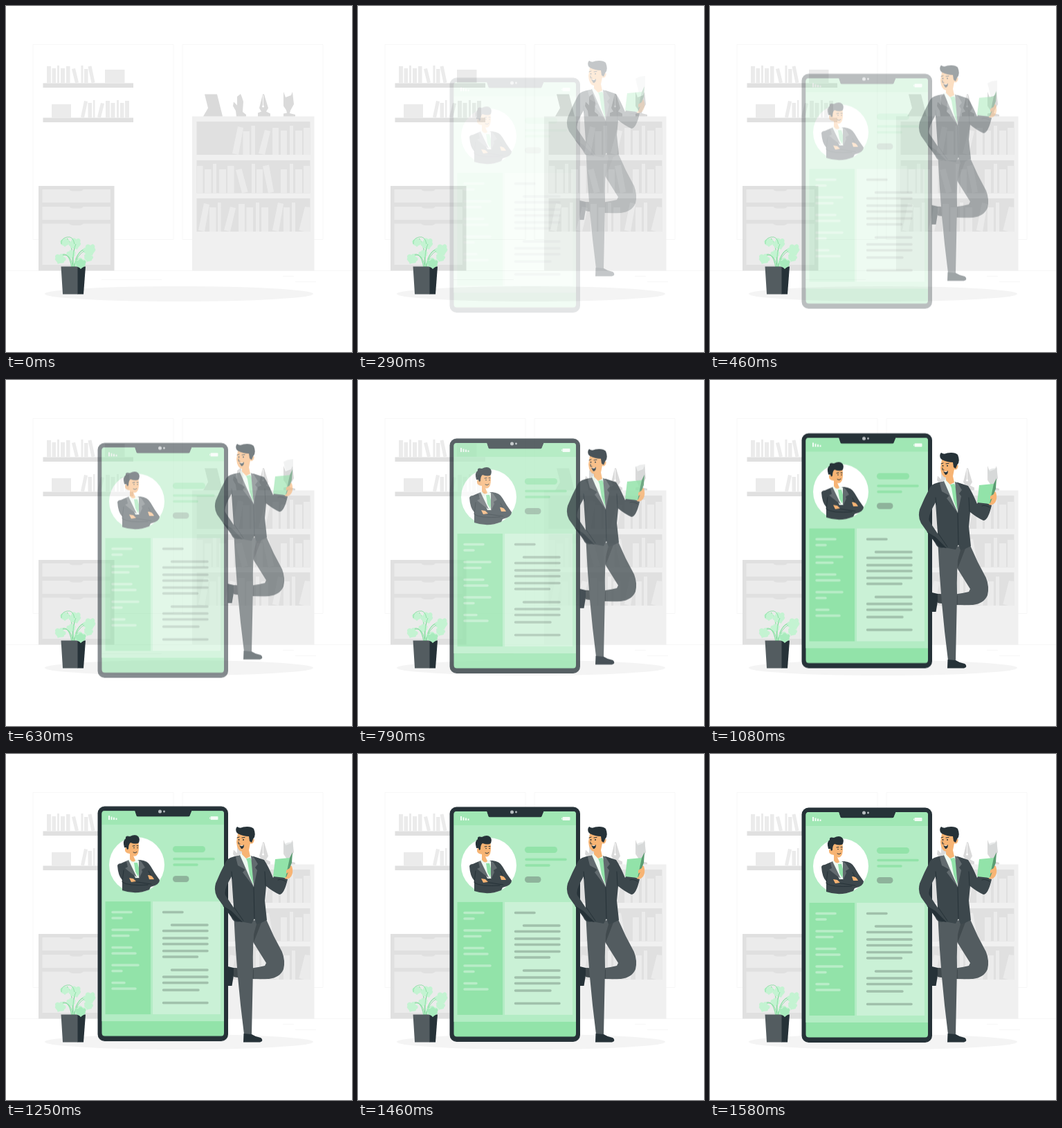
An HTML page without scripts for the animation above (1620 ms loop, 500 px wide and 500 px high).

```html
<!DOCTYPE html>
<html lang="en">
<head>
<meta charset="utf-8">
<title>Profile on a phone</title>
<style>
  html, body { margin: 0; width: 100%; height: 100%; overflow: hidden; background: #fff; }
  svg { display: block; width: 100%; height: 100%; }
  .wall { fill: none; stroke: #f7f7f7; }
  .frame { fill: #e0e0e0; }
  .pale { fill: #ebebeb; }
  .case { fill: #f0f0f0; }
  .ornament { fill: #dadada; }
  .ink { fill: #263238; }
  .suit { fill: #3c474c; }
  .lapel { fill: #626b6f; }
  .cloth { fill: #535c60; }
  .fold { fill: none; stroke: #263238; stroke-width: 1; stroke-linecap: round; }
  .skin { fill: #f7b474; }
  .shirt { fill: #eefaf2; }
  .mint { fill: #92e3a9; }
  .line { fill: none; stroke-width: 3.5; stroke-linecap: round; }
  .phone { animation: rise 1620ms infinite; }
  .man { animation: drop 1620ms linear infinite; }
  @keyframes rise {
    0% { opacity: 0; transform: translateY(30px); animation-timing-function: cubic-bezier(.36, -.01, .5, 1.38); }
    95.5%, 100% { opacity: 1; transform: none; }
  }
  @keyframes drop {
    0%, 8% { opacity: 0; transform: translateY(-30px); }
    17.9% { opacity: .27; transform: translateY(-26px); }
    38.9% { opacity: .62; transform: translateY(-12.7px); }
    48.8% { opacity: .84; transform: translateY(-5.3px); }
    56.8% { opacity: .98; transform: translateY(-.5px); }
    60%, 100% { opacity: 1; transform: none; }
  }
</style>
</head>
<body>
<svg viewBox="0 0 500 500">
  <defs>
    <path id="leaf" d="M0 9C-3 4-9 6-8 1-12-2-8-8-4-6-3-11 3-10 4-6 9-8 11-3 8 0 10 5 4 4 0 9Z"/>
  </defs>

  <!-- room -->
  <path class="wall" d="M39 55.5H242V337.500H39ZM255 55.5H458V337.500H255ZM0 382.500H500M138 395.500H225M400 390.500H416M418 398.500H448"/>
  <ellipse cx="250" cy="416" rx="194" ry="11" fill="#f4f4f4"/>

  <!-- wall shelves -->
  <path class="frame" d="M53.500 111.500h130.500v6.500h-130.500zM53.500 161.500h130.500v6.500h-130.500z"/>
  <path class="pale" d="M59 87h6v24.500h-6zM66.500 90h5.500v21.500h-5.500zM74 86h3v25.500h-3zM79 90h6v21.500h-6zM87 87h5.500v24.500h-5.500zM95 91l5-1 5 20.500-5 1zM108.500 86h3v25.500h-3zM113 91h5.500v20.500h-5.500zM118.500 87.500l5-1 5 24-5 1zM143 92h28.500v19.500h-28.500z
    M66 142h28v19.500h-28zM113 137l5 1-5 23.500-5-1zM118.500 140h5.500v21.500h-5.500zM126 136h2.500v25.500h-2.500zM137 140l5 1-5 20.500-5-1zM144 137h6v24.500h-6zM151.500 140h6v21.500h-6zM160 136h3v25.500h-3zM165 140h5.500v21.500h-5.500zM172 137h6v24.500h-6z"/>

  <!-- cabinet -->
  <path class="frame" d="M47 260h109.500v122.500h-109.500z"/>
  <path class="pale" d="M52.500 265h98.500v19h-98.500zM52.500 290h98.500v19h-98.500zM52.500 314.500h98.500v59.500h-98.500z"/>
  <path class="frame" d="M91 264.500h21q-2 3-5 3h-11q-3 0-5-3M91 289.500h21q-2 3-5 3h-11q-3 0-5-3M91 314h21q-2 3-5 3h-11q-3 0-5-3"/>

  <!-- bookcase -->
  <path class="case" d="M269 159.500h176.500v223h-176.500z"/>
  <path class="frame" d="M275.500 167h164v48h-164zM275.500 223h164v47.500h-164zM275.500 278h164v48h-164z"/>
  <path class="pale" d="M335 174l8 2-7 39-9-2zM342.500 181h9.500v34h-9.500zM354.500 173h5.500v42h-5.500zM374 179l8 2-8 34-9-2zM385 176h9v39h-9zM397 180h9v35h-9zM410 173h5v42h-5zM418 180h10v35h-10zM430 176h9v39h-9z
    M276 231h8.500v39.500h-8.500zM287 236h9.500v34.500h-9.500zM299 228h5v42.500h-5zM308 236h10v34.500h-10zM320 231h9.500v39.500h-9.500zM332 237l8.500-2 9 33.500-8.500 2zM355 228h5v42.500h-5zM362 236h9v34.500h-9zM371 231.500l9-2 7 39-8 2zM397 236h9v34.500h-9zM410 228h5v42.500h-5zM418 236h10v34.500h-10zM430 231h9v39.500h-9z
    M286 285l8 2-7 39-9-2zM294 291h9.500v35h-9.500zM306 284h4.500v42h-4.500zM324 290l8 2-8 34-9-2zM336 286h9v40h-9zM347.500 291h9.500v35h-9.500zM361 284h5v42h-5zM369 291h10v35h-10zM393 284l8 2-7 40-9-2zM401 291h9v35h-9zM413 284h5v42h-5zM432 290l7.500 1v35h-9l-7-2z"/>
  <path class="ornament" d="M287 127.500h18l8 32h-28l7-12z
    M333 159.500l-1-8-4-7 1-6 5 5V131l5-4 2 5 2 6-1 15 5 4v2.500z
    M364 159.500v-5l5-2-3-5 5-20h2l6 20-3 5 6 3v4z
    M401 159.500v-4l5-1-1-4-4-6V124l3 8 8-3 2-5 2 18-5 9-1 4 8 2v2.500z"/>
  <path d="M371.500 129v15" stroke="#fff" stroke-width=".8"/><circle cx="371.500" cy="145" r="1.500" fill="#fff"/>

  <!-- plant -->
  <g fill="none" stroke="#92e3a9" stroke-width="1.300">
    <path d="M96 378Q98 346 88 336M97 378Q95 352 104 340M98 378Q102 350 121 350M95 378Q91 354 80 360M99 378Q102 362 108 366"/>
  </g>
  <g fill="#c4f3d2">
    <use href="#leaf" transform="translate(85 342) scale(.7)"/>
    <use href="#leaf" transform="translate(100 344) rotate(-20) scale(.95)"/>
    <use href="#leaf" transform="translate(121 353) rotate(-25) scale(.98)"/>
    <use href="#leaf" transform="translate(119 364) rotate(20) scale(.7)"/>
    <use href="#leaf" transform="translate(78 366) rotate(25) scale(.85)"/>
    <use href="#leaf" transform="translate(107 372) scale(.9)"/>
    <use href="#leaf" transform="translate(94 359) scale(.68)"/>
  </g>
  <path d="M80 344q-1-8 8-10t11 10M97 374q-1-20 4-30M99 374q4-14 14-20M96 374q-3-16-14-14" fill="none" stroke="#7fdc9b" stroke-width=".8"/>
  <path class="cloth" d="M79.500 376.500H104V416.500H82Z"/>
  <path class="ink" d="M103.500 376.500H115L112 416.500H103.500ZM104"/>
  <use href="#leaf" transform="translate(108 373) scale(.8)" fill="#a8ebbd"/>

  <g class="phone">
    <rect class="ink" x="132.500" y="77.500" width="188.500" height="339.500" rx="10"/>
    <path class="mint" d="M143 84H186L188.500 91.500Q189 92.500 191 92.500H263Q265 92.500 265.500 91.500L268.500 84H311Q315 84 315 88V405Q315 409.500 311 409.500H143Q138.500 409.500 138.500 405V88Q138.500 84 143 84Z"/>
    <path d="M138.500 104H315V388H138.500Z" fill="#b3ecc4"/>
    <path d="M143 84H186L188.500 91.500Q189 92.500 191 92.500H263Q265 92.500 265.500 91.500L268.500 84H311Q315 84 315 88V104H138.500V88Q138.500 84 143 84Z" fill="#a0e7b4"/>
    <path class="mint" d="M143.500 215H209V378H143.500Z"/>
    <path d="M212 215H310V378H212Z" fill="#caf1d6"/>
    <circle cx="222.500" cy="85" r="2.500" fill="#b8bec1"/><circle cx="228.500" cy="85" r="1.400" fill="#b8bec1"/>
    <path fill="#f4fcf6" d="M148 91h2v6h-2zM151.500 92.500h2v4.500h-2zM155 93.500h2v3.500h-2zM158.500 94.500h2v2.500h-2zM296.500 92h9q1 0 1 1v3q0 1-1 1h-9q-1 0-1-1v-3q0-1 1-1M294 93.500h1v2h-1z"/>
    <rect class="mint" x="241" y="135" width="47" height="9" rx="4.500"/>
    <rect x="241" y="178" width="23.500" height="9" rx="4.500" fill="#8eb39b"/>
    <path class="line" stroke="#92e3a9" d="M243 153.500H300M243 162H276"/>
    <path class="line" stroke="#b9edc8" d="M154 230.500H181M154 239H167M154 256H191M154 264.500H177M154 281.500H181M154 290H187M154 307H191M154 315.500H167M154 332.500H171M154 341H187"/>
    <path class="line" stroke="#a0c0ab" d="M227.500 230.500H255M239.500 249H291M227.500 257.500H291M227.500 268H291M227.500 276.500H291M227.500 286.500H291M227.500 295H276.500M239.500 314H291M227.500 324H291M227.500 332.500H291M227.500 343H278M227.500 361.500H291"/>

    <!-- portrait -->
    <circle cx="189" cy="162" r="40" fill="#fff"/>
    <path class="suit" d="M166 160Q174 156 180 155H194Q205 156 209 164L215 174 222 184Q222 191 209 194L207 198Q188 206 168 199L168 184Q162 178 161 163Q162 160 166 160Z"/>
    <path class="shirt" d="M176 156L181 152 190 155 194 157 193 181 187 181Z"/>
    <path class="mint" d="M185 159L190 159 193 170 191 179 187 172Z"/>
    <path class="lapel" d="M174 157L177 155 189 180 182 175 172 167 176 165ZM192 155L196 158 201 166 196 169 197 172 192 182Z"/>
    <path class="skin" d="M174 130Q180 125 191 128Q193 137 191 145Q188 151 184 149L187 156Q183 160 179 154L179 146Q171 145 172 139Q172 136 175 138Z"/>
    <path class="ink" d="M171 137Q168 127 173 124Q172 119 179 121Q187 117 191 121Q194 124 192 130Q188 133 180 130Q177 132 177 139L175 140 174 137Z"/>
    <path class="fold" d="M183 135l3-.5M189 134.500h2M184 144q3 2 5-.5M170 170L168 187Q177 193 205 191M206 171L211 181M183 186L210 190"/>
    <circle class="ink" cx="185" cy="137.500" r=".8"/><circle class="ink" cx="190" cy="137.500" r=".8"/>
    <path class="skin" d="M178 181l6 1 4 4-7 1zM205 177q6-1 9 6l-7 0z"/>
  </g>

  <g class="man">
    <!-- legs -->
    <path class="ink" d="M320.500 307L329 309 329 320 326.500 335 320.500 335Z"/>
    <path class="cloth" d="M350 241L376 239Q386 263 399 286Q404 299 401 311Q396 323 380 325Q350 326 329 322L329 309Q350 312 374 306L376 302 356 270Z"/>
    <path d="M357 264L362 246 370 241 358 272ZM329 309L358 311V325L329 322Z" fill="#414a4e"/>
    <path class="cloth" d="M329.500 238L360 242Q356 275 357 310L355 405H344Q333 320 329.500 238Z"/>
    <path class="ink" d="M343.500 404L355 405Q361 409 368 410Q371 412 370 415L367 416.500H343Z"/>

    <!-- jacket and arms -->
    <path class="suit" fill-rule="evenodd" d="M336 147Q321 149 318 155Q310 170 303 187Q300 198 305 207L325 235Q330 246 338 242L355 245 359 238 362 246Q370 244 377 240L374 212 376 191Q386 199 395 203Q402 203 407 181L389 173 386 179Q379 162 373 153L358 148ZM326 177L329 222 317 204Q314 197 326 177Z"/>
    <path class="fold" d="M326 170L327 180M330 222L343 241M374 170L375 190M358 193L359 238M393 182Q397 180 404 184"/>
    <path class="ink" d="M313 219L326 227 342 243 331 241Z"/>
    <path class="shirt" d="M336 147L341 143 355 147 359 160 358 192Z"/>
    <path class="mint" d="M347 151L353 150 355 154 358 178 357 188 352 174 349 156Z"/>
    <path class="lapel" d="M332 149L338 146 358 192 342 171 346 167 335 161ZM354 147L358 149 364 159 360 164 363 168 358 192Z"/>

    <!-- head -->
    <path class="skin" d="M335 115Q345 110 356 116L356 123Q360 122 358 127Q356 131 353 129L351 139 353 148 347 151 341 145 341 141Q334 140 333 127Z"/>
    <path class="ink" d="M333 113Q331 108 334 105Q338 108 343 105.500Q354 104 358 108Q362 118 357 123L355 128 352 126 351 119Q343 119 335 115Z"/>
    <path class="fold" d="M334 121l3-1M341 121l4-.5M336 127l0 3 2 0"/>
    <circle class="ink" cx="336.500" cy="124" r="1"/><circle class="ink" cx="343" cy="124" r="1"/>
    <path class="ink" d="M337 132Q341 134 344 131Q344 137 340 137Z"/><path d="M338 132.500Q341 134 343.500 132Z" fill="#fff"/>

    <!-- book -->
    <path class="skin" d="M404 164Q409 159 413 162Q416 171 412 177Q408 182 403 180L402 174Z"/>
    <path d="M401 131L407 128 415 127V143L406 152Z" fill="#d5d9d8" opacity=".55"/>
    <path d="M409 152L414 142 413 157 405 178 403 177Z" fill="#5a9c72"/>
    <path class="mint" d="M389 152L410 150 404 179 386 177Z"/>
    <path class="skin" d="M405 168l5-3 2 3-7 5z"/>
  </g>
</svg>
</body>
</html>
```
